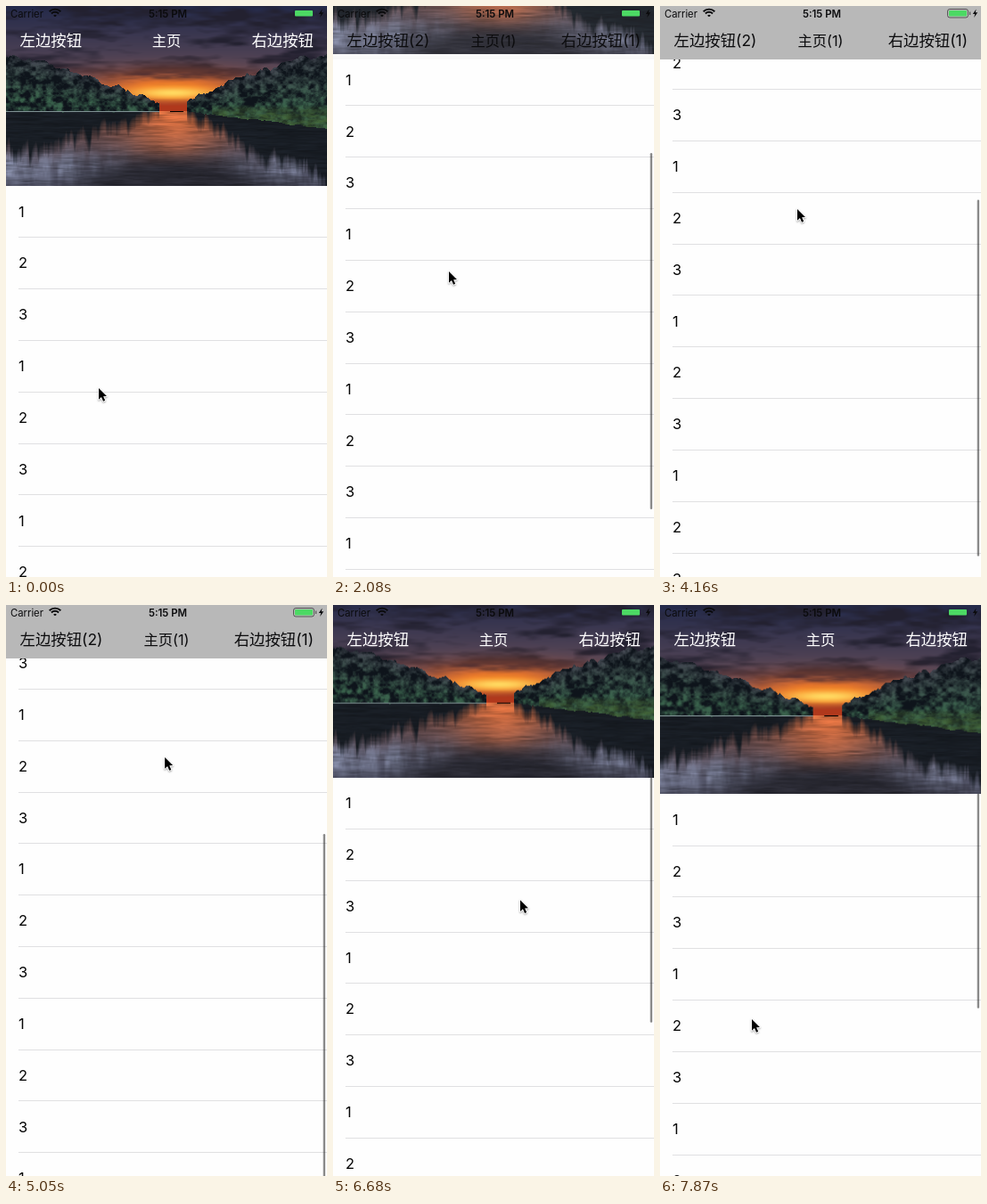
An HTML page with a canvas that plays this animation: 360 by 641 pixels, repeating every 8 s.

```html
<!DOCTYPE html>
<html lang="zh">
<head>
<meta charset="utf-8">
<title>Stretchy header list</title>
<style>
html, body { margin: 0; width: 100%; height: 100%; overflow: hidden; background: #fefefe; }
canvas { display: block; width: 360px; height: 641px; }
</style>
</head>
<body>
<canvas id="stage"></canvas>
<script>
const W = 360, HT = 641, LOOP = 8000, STEP = 1040 / 7;
const HEADER = 202, NAV = 60, ROW = 57.83, SHORE = 118;
const LATIN = 'Inter, "Noto Sans", sans-serif';
const CJK = 'Inter, "Noto Sans CJK SC", "Noto Sans CJK", sans-serif';

// the hand rests during these spans
const PAUSES = [[150, 300], [2670, 3560], [5490, 5790]];
// moving time, x, y
const POINTER = [[0, 104, 429], [150, 103, 465], [1040, 121, 361], [1930, 130, 298],
  [3120, 154, 228], [4450, 190, 143], [4750, 214, 239], [5790, 207, 400], [6530, 222, 302]];

const canvas = document.getElementById('stage');
const dpr = window.devicePixelRatio || 1;
canvas.width = W * dpr;
canvas.height = HT * dpr;
const ctx = canvas.getContext('2d');

const clamp = v => Math.max(0, Math.min(1, v));
const lerp = (a, b, t) => a + (b - a) * t;
const bell = v => Math.exp(-v * v);

function movingTime(t) {
  return PAUSES.reduce((m, [a, b]) => m - Math.max(0, Math.min(t, b) - a), t);
}

// bottom edge of the photo: a slowing drag up, then a flick back down
function photoEdge(t) {
  const s = movingTime(t) - 150;
  if (s <= 0) return HEADER;
  if (t > 5800) return 212.6 - 131.6 * Math.exp((6090 - t) / 308);
  return 168 - 0.064 * s + 34 * Math.exp(-s / 250);
}

function pointerAt(t) {
  const m = movingTime(t);
  const i = Math.max(1, POINTER.findIndex(k => k[0] >= m - 1));
  const a = POINTER[i - 1], b = POINTER[i];
  const p = clamp((m - a[0]) / (b[0] - a[0]));
  return [lerp(a[1], b[1], p), lerp(a[2], b[2], p)];
}

function hash(x, y) {
  const v = Math.sin(x * 127.1 + y * 311.7) * 43758.5453;
  return v - Math.floor(v);
}

function noise(x, y) {
  const ix = Math.floor(x), iy = Math.floor(y);
  const ease = v => v * v * (3 - 2 * v);
  const u = ease(x - ix), v = ease(y - iy);
  return lerp(lerp(hash(ix, iy), hash(ix + 1, iy), u),
    lerp(hash(ix, iy + 1), hash(ix + 1, iy + 1), u), v);
}

const rough = (x, y) => noise(x, y) * 0.55 + noise(x * 2.1, y * 2.1) * 0.3 + noise(x * 4.3, y * 4.3) * 0.15;

const mix = (a, b, t) => a.map((v, i) => lerp(v, b[i], clamp(t)));

// height of the tree line, falling from both sides to the gap
function treeTop(x) {
  const ragged = (rough(x / 9, 3) - 0.5) * 12;
  if (x < 172) return 55 + 54 * (x / 172) ** 1.3 + ragged;
  if (x > 202) return 55 + 50 * ((W - x) / 158) ** 1.5 + ragged;
  return SHORE;
}

const bankEnd = x => SHORE + Math.max(0, x - 202) * 0.12;

function sky(x, y) {
  let c = mix([36, 42, 74], [92, 74, 88], y / 80);
  c = mix(c, [35, 33, 48], (rough(x / 42, y / 10) - 0.42) * 3);
  c = mix(c, [198, 92, 56], bell((x - 184) / 105) * bell((y - 92) / 20) * 1.1);
  c = mix(c, [248, 130, 34], bell((x - 184) / 62) * bell((y - 95) / 13) * 1.2);
  c = mix(c, [255, 216, 96], bell((x - 186) / 42) * bell((y - 97) / 6));
  c = mix(c, [70, 42, 46], bell((y - 77) / 7) * (rough(x / 30, y / 5) - 0.25) * 1.5);
  return mix(c, [176, 56, 28], (y - 103) / 9);
}

function trees(x, y, top) {
  const low = clamp((y - top) / (bankEnd(x) - top));
  const lit = mix([66, 70, 80], [58, 98, 76], low * 1.4);
  const c = mix([14, 20, 27], lit, (rough(x / 6, y / 5) - 0.32) * 2.2);
  const grass = x > 230 ? clamp((y - 110) / 10) : 0;
  return mix(c, [70, 104, 54], grass * rough(x / 9, y / 3));
}

function water(x, y) {
  const depth = (y - SHORE) / (HEADER - SHORE);
  const ripple = rough(x / 24, y / 2);
  const side = 1 - bell((x - 182) / 85);
  let c = mix([112, 74, 66], [58, 58, 74], depth * 1.2);
  c = mix(c, [206, 106, 62], bell((x - 188) / 52) * (1.15 - depth * 1.3));
  c = mix(c, [128, 134, 160], side * bell((depth - 0.75) / 0.25) * rough(x / 9, y / 30) * 1.5);
  const reach = bankEnd(x) + (SHORE - treeTop(x)) * (0.5 + rough(x / 7, 9) * 0.9);
  c = mix(c, [24, 29, 36], x > 172 && x < 202 ? 0 : (reach - y) / 14 * 0.92);
  c = mix(c, [40, 40, 49], (y - 160) / 22 * bell((x - 185) / 95));
  return c.map(v => v * (0.72 + ripple * 0.56));
}

function photoColor(x, y) {
  const top = treeTop(x);
  if (y < SHORE && y < top) return sky(x, y);
  if (x < 172 && Math.abs(y - SHORE) < 1) return [128, 146, 148];
  if (y < bankEnd(x) + (rough(x / 8, 5) - 0.5) * 4) return trees(x, y, top);
  return water(x, y);
}

function makePhoto() {
  const c = document.createElement('canvas');
  c.width = W;
  c.height = HEADER;
  const g = c.getContext('2d');
  const img = g.createImageData(W, HEADER);
  for (let y = 0; y < HEADER; y++) {
    for (let x = 0; x < W; x++) img.data.set([...photoColor(x, y), 255], (y * W + x) * 4);
  }
  g.putImageData(img, 0, 0);
  return c;
}

const photo = makePhoto();

function text(str, x, y, font, color, align = 'left') {
  ctx.font = font;
  ctx.textAlign = align;
  ctx.fillStyle = color;
  ctx.fillText(str, x, y);
}

function polygon(points) {
  ctx.beginPath();
  points.forEach(([x, y]) => ctx.lineTo(x, y));
  ctx.closePath();
}

function pill(x, y, w, h, r) {
  ctx.beginPath();
  ctx.roundRect(x, y, w, h, r);
}

function drawList(edge, moving) {
  const barTop = 63 + Math.max(0, HEADER - edge) * 0.69;
  const barEnd = barTop + 400 - Math.max(0, edge - HEADER);
  // mid-drag the separators show only beside the scroll indicator
  const faint = edge > 65 && edge < 130;
  for (let y = edge; y < HT; y += ROW) {
    const n = Math.round((y - edge) / ROW);
    text(String(n % 3 + 1), 14, y + 34.6, '16.5px ' + LATIN, '#050505');
    const line = Math.floor(y + ROW);
    ctx.fillStyle = '#e0e0e2';
    if (!faint) ctx.fillRect(14, line, W - 14, 1);
    else if (line > barTop && line < barEnd) ctx.fillRect(354, line, 5, 1);
  }
  if (!moving) return;
  ctx.fillStyle = 'rgba(0,0,0,.46)';
  pill(355.7, barTop, 2.4, barEnd - barTop, 1.2);
  ctx.fill();
}

function drawPhoto(edge) {
  if (edge <= 0) return;
  const zoom = Math.max(1, edge / HEADER);
  const w = W * zoom, h = HEADER * zoom;
  ctx.drawImage(photo, (W - w) / 2, edge - h, w, h);
}

function drawStatus(solid) {
  const ink = '#0b0b0d';
  text('Carrier', 5, 12.6, '11.3px ' + LATIN, ink);
  text('5:15 PM', 181.5, 12.6, '600 11.4px ' + LATIN, ink, 'center');
  ctx.strokeStyle = ctx.fillStyle = ink;
  ctx.lineWidth = 1.9;
  for (const r of [9, 5.8, 1.7]) {
    ctx.beginPath();
    ctx.arc(55, 12.6, r, -Math.PI * 0.75, -Math.PI * 0.25);
    ctx.stroke();
  }
  polygon([[354.6, 3.5], [350.8, 9], [353.2, 9], [352.2, 13], [356.2, 7.3], [353.8, 7.3]]);
  ctx.fill();

  ctx.lineWidth = 1;
  ctx.strokeStyle = ctx.fillStyle = `rgba(20,20,20,${0.15 + solid * 0.45})`;
  pill(322.5, 3.5, 23, 9.5, 2.5);
  ctx.stroke();
  ctx.fillRect(347, 6.5, 1.2, 3.5);
  ctx.fillStyle = '#4cd964';
  pill(324, 5, 20, 6.6, 1);
  ctx.fill();
}

function drawNav(edge) {
  const solid = clamp((58 - edge) / 58);
  ctx.fillStyle = `rgba(184,184,184,${solid})`;
  ctx.fillRect(0, 0, W, NAV);
  drawStatus(solid);
  const dark = edge < 62;
  const ink = dark ? '#0c0c0e' : '#fff';
  const side = '17.4px ' + CJK;
  text('左边按钮' + (dark ? '(2)' : ''), 15.5, 45.3, side, ink);
  text('主页' + (dark ? '(1)' : ''), 180, 45, '16.3px ' + CJK, ink, 'center');
  text('右边按钮' + (dark ? '(1)' : ''), 345, 45.3, side, ink, 'right');
}

function drawPointer([x, y]) {
  ctx.save();
  ctx.translate(x, y);
  ctx.scale(0.9, 0.9);
  polygon([[0, 0], [0, 14.2], [3.3, 11.2], [5.6, 16.4], [8, 15.4], [5.7, 10.3], [10, 10.1]]);
  ctx.lineJoin = 'round';
  ctx.shadowColor = 'rgba(0,0,0,.35)';
  ctx.shadowBlur = 2 * dpr;
  ctx.shadowOffsetY = dpr;
  ctx.strokeStyle = '#fff';
  ctx.lineWidth = 2;
  ctx.stroke();
  ctx.shadowColor = 'transparent';
  ctx.fillStyle = '#000';
  ctx.fill();
  ctx.restore();
}

function draw(now) {
  const t = Math.floor((now % LOOP + 9) / STEP) * STEP;
  const edge = photoEdge(t);
  ctx.setTransform(dpr, 0, 0, dpr, 0, 0);
  ctx.fillStyle = '#fefefe';
  ctx.fillRect(0, 0, W, HT);
  drawList(edge, t > 400);
  drawPhoto(edge);
  drawNav(edge);
  drawPointer(pointerAt(t));
}

const start = performance.now();
function tick() {
  draw(performance.now() - start);
  requestAnimationFrame(tick);
}
tick();
</script>
</body>
</html>
```
